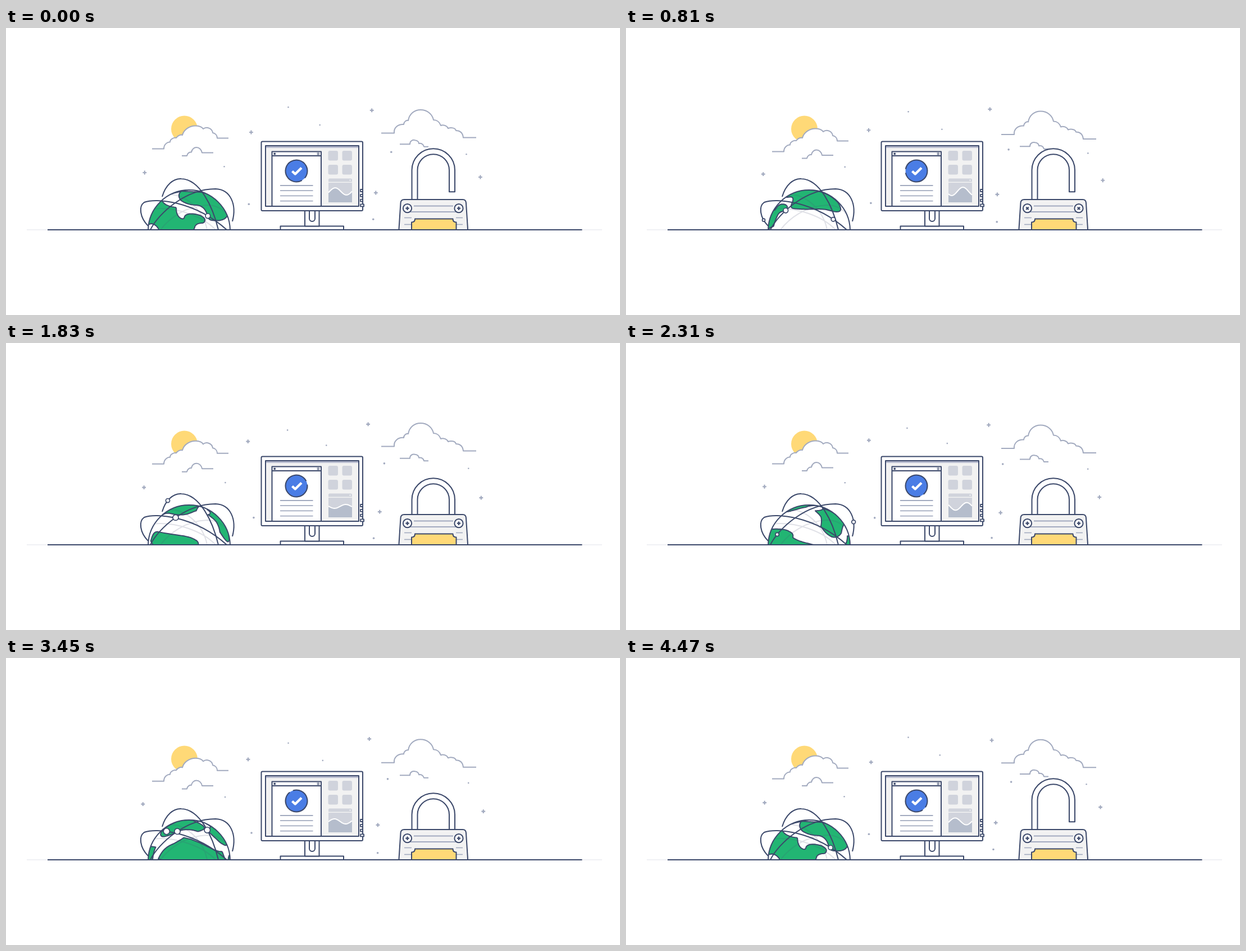
These frames come from a looping animation (1093 by 512 pixels, 4.5 s). An HTML page with a canvas:

```html
<!DOCTYPE html>
<html lang="en">
<head>
<meta charset="utf-8">
<title>Secure desktop</title>
<style>
html, body { margin: 0; width: 100%; height: 100%; overflow: hidden; background: #fff; }
canvas { display: block; width: 1093px; height: 512px; }
</style>
</head>
<body>
<canvas id="stage"></canvas>
<script>
const LOOP = 4500, HALF = LOOP / 2, TAU = Math.PI * 2;
const INK = '#3b486a', SOFT = '#a2aabf', PALE = '#d0d3dc', PAPER = '#f2f2f2';
const GREEN = '#22b573', YELLOW = '#ffd977', BLUE = '#4a7de5';

const canvas = document.getElementById('stage');
const c = canvas.getContext('2d');
const dpr = window.devicePixelRatio || 1;
canvas.width = 1093 * dpr;
canvas.height = 512 * dpr;

const clamp = v => Math.max(0, Math.min(1, v));
const ease = (t, a, b) => { const p = clamp((t - a) / (b - a)); return p * p * (3 - 2 * p); };
const wave = (t, lag = 0) => Math.sin(TAU * (t - lag) / HALF);
const swell = (t, lag = 0) => Math.cos(TAU * (t - lag) / HALF);

function paint(path, fill, stroke, width = 2) {
  if (fill) { c.fillStyle = fill; c.fill(path); }
  if (stroke) { c.strokeStyle = stroke; c.lineWidth = width; c.stroke(path); }
}
const draw = (d, fill, stroke, width) => paint(new Path2D(d), fill, stroke, width);
function box(x, y, w, h, r, fill, stroke, width) {
  const p = new Path2D();
  p.roundRect(x, y, w, h, r);
  paint(p, fill, stroke, width);
}
function disc(x, y, r, fill, stroke, width) {
  const p = new Path2D();
  p.arc(x, y, r, 0, TAU);
  paint(p, fill, stroke, width);
}
const line = (x1, x2, y, color, width) => draw(`M${x1} ${y}H${x2}`, null, color, width);
function shifted(dy, fn) {
  c.save();
  c.translate(0, dy);
  fn();
  c.restore();
}

// Returns a function giving the point at share s of a path
function track(d) {
  const path = document.createElementNS('http://www.w3.org/2000/svg', 'path');
  path.setAttribute('d', d);
  const length = path.getTotalLength();
  return s => path.getPointAtLength(s * length);
}

// Sky
const CLOUDS = {
  left: 'M260 215.5H281C281 207 288 203 292 203.5C292 198 299 195 303 196C306 191 312 190 314 191C317 180 328 174.5 337 174.5C344 174.5 349 177 351 180C357 175 367 179 368 187C373 188 376 192 376 196.5H396',
  leftSmall: 'M313 228H322C323 223 327 221 330 221.5C331 216 335 213 339 213C344 213 348 217 349 222.5H369',
  right: 'M668 187.5H691C690 178 698 171 708 172C708 168 712 164 716 165C718 153 727 146 738 146C750 146 759 154 761 164C767 164 772 168 774 174C778 172 785 174 787 179C792 177 800 178 801 183C808 183 813 187 814 195.5H837',
  rightSmall: 'M701 207H719C719 201 724 199 728 200C733 200 735 204 735 206C739 205 743 207 744 211.5H752'
};

function sky(t) {
  const u = t % HALF;
  disc(317.5, 180, 23.5, YELLOW);
  shifted(5.2 * (ease(u, 0, 900) - ease(u, 900, 2000)), () => draw(CLOUDS.left, '#fff', SOFT));
  shifted(2.75 * (1 - swell(t)), () => draw(CLOUDS.leftSmall, null, SOFT));
  shifted(3.3 * wave(t), () => draw(CLOUDS.right, null, SOFT));
  shifted(1.5 + 2.75 * wave(t, 187), () => draw(CLOUDS.rightSmall, null, SOFT));
}

// Specks drift along short bows, out and back
const PLUSES = [
  'M436.4 186Q426 179 432.7 173.3', 'M651.2 146.8Q641 140.5 645.8 146.5',
  'M246.8 258Q240.6 265 246.7 256', 'M844.4 266Q857 281 842.3 274.8',
  'M658.3 294Q656 292 667 303'
].map(track);
const SMALL_DOTS = [
  'M502.5 141.3Q503 167 500.3 151.3', 'M558.7 173Q567 194 572 178.5',
  'M388.5 247.2Q392 249 389.7 249.3', 'M819.5 225.3Q828 219.5 822 225'
].map(track);
const BIG_DOTS = [
  'M685.8 221.3Q677.5 211.5 670.3 216.2', 'M432.3 314.3Q437.5 310.5 443 312',
  'M653.7 341.3Q671 352 650.5 347.5'
].map(track);

function specks(t) {
  const s = 1 - Math.abs(1 - t / HALF);
  for (const at of PLUSES) {
    const { x, y } = at(s);
    draw(`M${x - 3.4} ${y}h6.8M${x} ${y - 3.4}v6.8`, null, SOFT, 2.2);
  }
  const dots = (tracks, r) => tracks.forEach(at => disc(at(s).x, at(s).y, r, SOFT));
  dots(SMALL_DOTS, 1.3);
  dots(BIG_DOTS, 1.8);
}

// Globe: a sphere turning about a tilted axis
const GLOBE = { x: 326, y: 362, r: 73 };
const SIN = Math.sin(0.3), COS = Math.cos(0.3);
const STEPS = 160;

// Screen point to height along the axis, distance from it and longitude.
// Points outside the disc lie folded round the back.
function toSphere({ x, y }) {
  const { r } = GLOBE;
  x -= GLOBE.x;
  y = GLOBE.y - y;
  const d = Math.hypot(x, y), fold = d > r ? (2 * r - d) / d : 1;
  x *= fold;
  y *= fold;
  const z = Math.sqrt(Math.max(0, r * r - x * x - y * y)) * (d > r ? -1 : 1);
  const side = x * COS - y * SIN;
  return { up: x * SIN + y * COS, rad: Math.hypot(side, z), lon: Math.atan2(side, z) };
}

function toScreen({ up, rad, lon }, angle) {
  const side = rad * Math.sin(lon - angle);
  return { x: up * SIN + side * COS, y: side * SIN - up * COS, z: rad * Math.cos(lon - angle) };
}

// Coastlines as they look at a given time
const coast = (time, d) => {
  const at = track(d);
  return { time, pts: Array.from({ length: STEPS }, (_, i) => toSphere(at(i / STEPS))) };
};
const LANDS = [
  coast(0, 'M312 308C306 302 307 295 312 291L349 293L374 301Q396 316 394 335Q388 346 366 343Q360 342 358 333Q354 318 340 316Q324 316 312 308Z'),
  coast(0, 'M235 356Q240 326 262 316L277 306Q281 318 303 320Q303 333 309 338Q317 344 318 336Q324 328 345 334Q360 341 351 348Q337 348 336 356L328 374H275Q274 352 259 349Z'),
  coast(2940, 'M299 312L311 299L313 292L338 291L358 299Q380 310 372 319Q352 312 338 325Q322 332 312 329Q300 324 299 312Z'),
  coast(2310, 'M250 352Q254 332 262 332Q284 331 292 337Q299 340 297 347Q305 353 322 357L362 367L350 400H270Z')
];

// Keeps the visible coast and closes gaps along the rim
function land({ time, pts }, t) {
  const seen = pts.map(p => toScreen(p, TAU * (t - time) / LOOP));
  const start = Math.max(0, seen.findIndex((p, i) => p.z > 0 && seen.at(i - 1).z <= 0));
  if (seen[start].z <= 0) return;
  const path = new Path2D();
  let last = seen[start], gap = false;
  path.moveTo(last.x, last.y);
  for (let i = 1; i <= STEPS; i++) {
    const p = seen[(start + i) % STEPS];
    if (p.z <= 0) { gap = true; continue; }
    if (gap) {
      const a = Math.atan2(last.y, last.x), b = Math.atan2(p.y, p.x);
      const sweep = Math.atan2(Math.sin(b - a), Math.cos(b - a));
      path.arc(0, 0, GLOBE.r + 2, a, a + sweep, sweep < 0);
    }
    path.lineTo(p.x, p.y);
    last = p;
    gap = false;
  }
  path.closePath();
  paint(path, GREEN, INK);
}

const GRID = 'M275 360C290 340 320 317 358 316C376 316 388 325 394 334M260 323C300 318 350 335 373 360M283 298C318 292 352 325 358 360';
const ORBITS = [
  { d: 'M378 360C368 318 345 270 312 269C298 268 284 280 278 301', span: 900, starts: [1050, 3150] },
  { d: 'M257 360C272 330 320 287 373 287C400 288 411 315 403 345', span: 833, starts: [643, 1577, 2227, 3183] },
  { d: 'M393 360C335 308 266 303 246 311C236 318 238 338 253 353', span: 1100, starts: [650, 2815, 4280] }
];
ORBITS.forEach(o => { o.at = track(o.d); });

function globe(t) {
  const { x, y, r } = GLOBE, dome = new Path2D();
  dome.arc(x, y, r, 0, TAU);
  c.save();
  c.beginPath();
  c.rect(200, 200, 250, 160);
  c.clip();
  c.save();
  c.clip(dome);
  c.translate(x, y);
  LANDS.forEach(l => land(l, t));
  c.translate(-x, -y);
  draw(GRID, null, 'rgba(75,80,115,.17)');
  c.restore();
  paint(dome, null, INK);
  c.restore();

  ORBITS.forEach(o => draw(o.d, null, INK));
  for (const { at, span, starts } of ORBITS) for (const start of starts) {
    const s = ((t - start + LOOP) % LOOP) / span;
    if (s >= 1) continue;
    const p = at(s);
    disc(p.x, p.y, 5.6 * Math.sqrt(Math.sin(Math.PI * s)), '#fff', INK, 1.7);
  }
}

// Monitor
function chart(t) {
  box(574, 268.5, 42, 6, [2, 2, 0, 0], PALE);
  disc(612.5, 271.5, 1, '#fff');
  box(574, 276, 42, 35, 0, PALE);
  const amp = 5.7 + 2.8 * swell(t, 480);
  const crest = 590 + 40 * t / LOOP - 4 * swell(t);
  const curve = new Path2D();
  for (let x = 574; x <= 616; x++) curve.lineTo(x, 291.5 - amp * Math.cos(TAU * (x - crest) / 40));
  const area = new Path2D(curve);
  area.lineTo(616, 311);
  area.lineTo(574, 311);
  paint(area, '#b5bdcc');
  paint(curve, null, '#fff');
}

function badge(t) {
  disc(517, 255, 19.5, BLUE);
  const gap = (50 + 360 * t / HALF) * Math.PI / 180, ring = new Path2D();
  ring.arc(517, 255, 19.5, gap + 0.17, gap - 0.17 + TAU);
  paint(ring, null, INK);
  draw('M509.5 255.5L514.8 260.5L526 249.5', null, '#fff', 4.4);
}

function monitor(t) {
  box(488.5, 353.5, 112.5, 6.5, 0, '#fff', INK);
  box(532, 326, 25.5, 27.5, 0, '#fff', INK);
  draw('M540 326V340a5 5 0 0 0 10 0V326', null, INK);
  box(454.5, 202.5, 180.5, 123.5, 2, '#fff', INK);
  box(462, 210, 166, 108, 0, PAPER);
  box(462, 210, 166, 4, 0, '#b9bdd0');
  box(462, 210, 166, 108, 0, null, INK);
  for (let i = 0; i < 4; i++) box(631, 288 + 8.8 * i, i < 3 ? 4 : 6, 4, 0, '#fff', INK, 1.8);

  box(473.5, 220.5, 87.5, 97.5, 0, '#fff', INK);
  line(473.5, 561, 228, INK);
  box(476.5, 222.8, 3.4, 3.4, 0, INK);
  line(553.5, 558, 223.3, INK, 1.2);
  line(553.5, 558, 225.6, INK, 1.2);
  for (let i = 0; i < 4; i++) line(488, 546.5, 281 + 9.2 * i, SOFT, 1.8);
  badge(t);

  for (const x of [573.5, 598.5]) for (const y of [219, 244]) box(x, y, 17.5, 17.5, 3, PALE);
  chart(t);
}

// Padlock
function screw(x, y, angle) {
  disc(x, y, 7.6, '#fff', INK);
  c.save();
  c.translate(x, y);
  c.rotate(angle);
  draw('M-3.2 0H3.2M0 -3.2V3.2', null, INK, 2.2);
  c.restore();
}

function padlock(t) {
  const open = 1 - ease(t, 1150, 1330) + ease(t, 3700, 4050);
  const hop = -1.8 * Math.sin(Math.PI * clamp((t - 1330) / 180));
  c.save();
  c.beginPath();
  c.rect(680, 190, 160, 170);
  c.clip();
  c.translate(0, hop);
  shifted(26 * (1 - open), () =>
    draw('M722.5 318V253.5a38.25 38.25 0 0 1 76.5 0V292.3H789V253.5a28.25 28.25 0 0 0 -56.5 0V318Z', '#fff', INK));
  draw('M699 366L702.5 312Q703 306 709 306H813Q818.5 306 819 312L822.5 366Z', PAPER, INK);
  line(726, 796, 317.5, SOFT, 1.8);
  line(716, 806, 328, SOFT, 1.8);
  for (const y of [338.5, 350.5]) {
    line(709, 722, y, SOFT, 1.6);
    line(801, 813, y, SOFT, 1.6);
  }
  draw('M722 366V346.5Q728 346.5 728 340.5H795.5Q795.5 346.5 801.5 346.5V366Z', YELLOW, INK);
  const angle = ease(t, 600, 1020) * Math.PI / 2;
  screw(714.5, 321.7, angle);
  screw(806, 321.7, angle);
  c.restore();
}

function ground() {
  line(37, 1061, 360, '#ebecf0', 1.6);
  line(74, 1025.5, 360, INK);
}

function render(now) {
  const t = now % LOOP;
  c.setTransform(dpr, 0, 0, dpr, 0, 0);
  c.fillStyle = '#fff';
  c.fillRect(0, 0, 1093, 512);
  c.lineJoin = 'round';
  sky(t);
  specks(t);
  globe(t);
  monitor(t);
  padlock(t);
  ground();
  requestAnimationFrame(render);
}
requestAnimationFrame(render);
</script>
</body>
</html>
```
